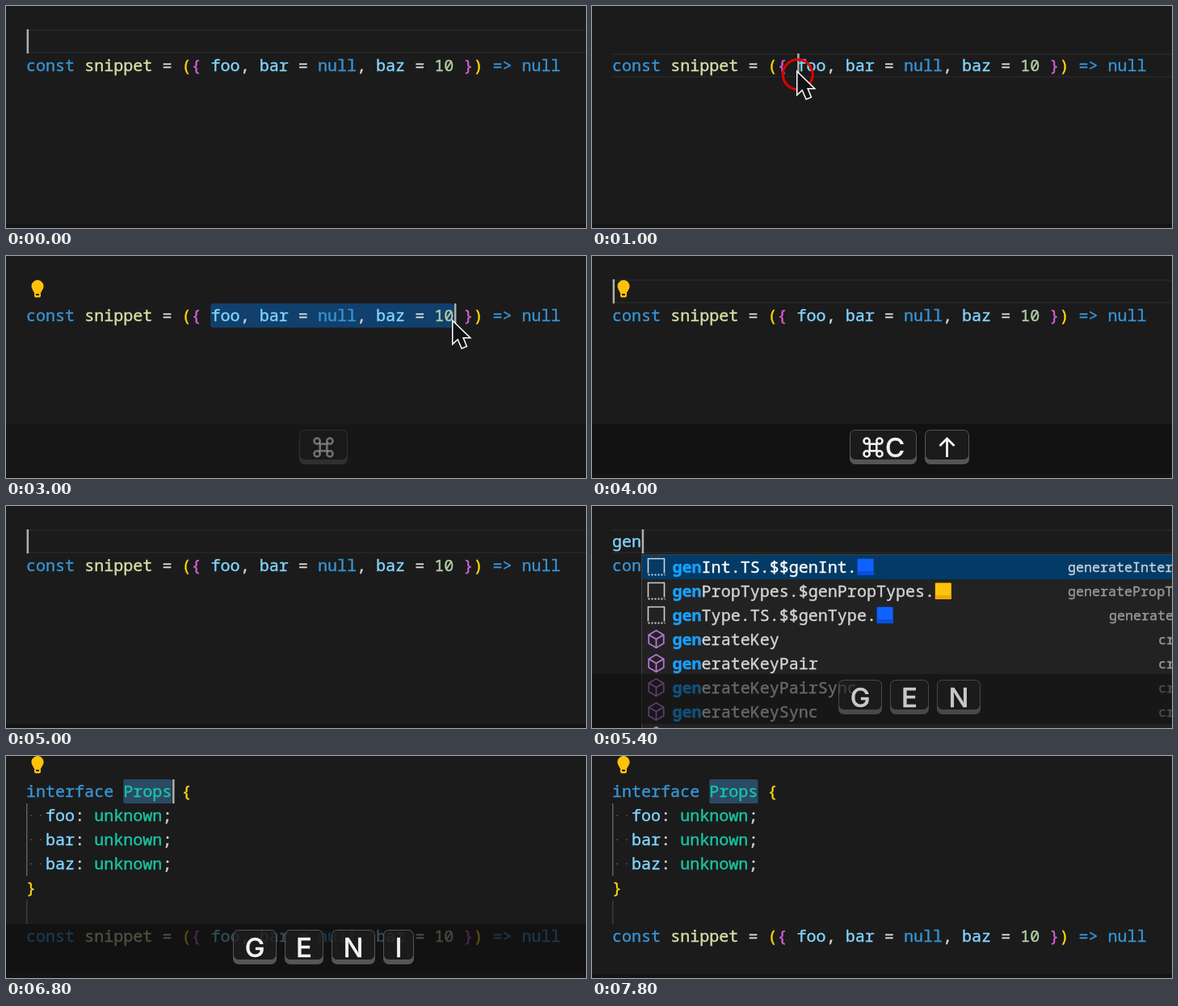
Animation, 718 px wide and 276 px high, one loop 8000 ms. Source, as an HTML page with a canvas:

```html
<!DOCTYPE html>
<html lang="en">
<head>
<meta charset="utf-8">
<title>Snippet demo</title>
<style>
  html, body { margin: 0; width: 100%; height: 100%; overflow: hidden; background: #1b1b1b; }
  canvas { display: block; }
</style>
</head>
<body>
<canvas id="stage" width="718" height="276"></canvas>
<script>
const ctx = document.getElementById('stage').getContext('2d');
const LOOP = 8000, STEP = 200;
const LEFT = 25, CHAR = 12.03, ROW = 30, TOP = 29;
const MONO = '"Noto Sans Mono", "DejaVu Sans Mono", monospace';
const CODE_FONT = `20.05px ${MONO}`, DETAIL_FONT = `16.7px ${MONO}`;
const KEY_FONT = '500 33px Inter, "DejaVu Sans", sans-serif';

const C = {
  bg: '#1b1b1b', keyword: '#3794d6', fn: '#d7dfa5', text: '#d4d4d4', paren: '#ffd70a',
  brace: '#d65fd6', name: '#80d4ff', number: '#b0cfa4', type: '#17c6a3', match: '#18a0fb',
};

const SNIPPET = [
  ['const', 'keyword'], [' snippet', 'fn'], [' = ', 'text'], ['(', 'paren'], ['{', 'brace'],
  [' foo', 'name'], [', ', 'text'], ['bar', 'name'], [' = ', 'text'], ['null', 'keyword'],
  [', ', 'text'], ['baz', 'name'], [' = ', 'text'], ['10', 'number'], [' }', 'brace'],
  [')', 'paren'], [' => ', 'keyword'], ['null', 'keyword'],
];

// Brackets in a label mark the matched letters.
const BLUE = ['#0f62ff', '#0a4fe0'], YELLOW = ['#ffc20a', '#f0a800'];
const GEN_ROWS = [
  ['snippet', '[gen]Int.TS.$$genInt.', 'generateInterface', 589, BLUE],
  ['snippet', '[gen]PropTypes.$genPropTypes.', 'generatePropTypes', 589, YELLOW],
  ['snippet', '[gen]Type.TS.$$genType.', 'generateType', 640, BLUE],
  ['cube', '[gen]erateKey', 'crypto', 701],
  ['cube', '[gen]erateKeyPair', 'crypto', 701],
  ['cube', '[gen]erateKeyPairSync', 'crypto', 701],
  ['cube', '[gen]erateKeySync', 'crypto', 701],
  ['cube', '[gen]eratePrime', 'crypto', 701],
];
const GENI_ROWS = [
  ['snippet', '[genI]nt.TS.$$genInt.', 'generateInterface', 601, BLUE],
  ['cube', '[GenI]con', 'react-icons', 663],
  ['cube', '[GenI]con', 'react-icons', 622],
  ['cube', '[ge]t[N]ext[I]nternalQuery', 'next/dist/server/request', 478],
  ['value', '[ge]t[In]trospectionQuery', 'graphql', 703],
  ['cube', '[gen]eratePr[i]me', 'crypto', 714],
  ['cube', '[gen]eratePr[i]meSync', 'crypto', 714],
  ['cube', '[gen]erateKeyPa[i]r', 'crypto', 714],
];

const KEY_WIDTH = { '⌘': 60, '⌘C': 83, '↑': 55, G: 54, E: 48, N: 54, I: 38 };
const KEY_STATES = [
  [3000, ['⌘']], [3200, ['⌘C']], [3600, ['⌘C', '↑']],
  [5200, ['G', 'E']], [5400, ['G', 'E', 'N']], [5600, ['G', 'E', 'N', 'I']],
];
const MOUSE_PATH = [
  [200, 330, 90], [600, 275, 85], [1000, 254, 82], [1300, 254, 82],
  [1400, 275, 82], [1600, 430, 82], [1800, 532, 82], [2000, 553, 81],
];
const CARET_RESETS = [0, 1000, 1400, 2000, 3600, 5200, 5400, 5600, 7000];

const col = n => LEFT + n * CHAR;
const lineTop = n => TOP + n * ROW;
const clamp = v => Math.max(0, Math.min(1, v));
const between = (t, a, b) => t >= a && t < b;

function rect(x, y, w, h, fill, radius = 0) {
  ctx.fillStyle = fill;
  ctx.beginPath();
  ctx.roundRect(x, y, w, h, radius);
  ctx.fill();
}

function stroke(points, color, width, closed) {
  ctx.beginPath();
  points.forEach(([x, y]) => ctx.lineTo(x, y));
  if (closed) ctx.closePath();
  ctx.strokeStyle = color;
  ctx.lineWidth = width;
  ctx.stroke();
}

// A hairline outline gives the text its slightly heavier weight.
function text(str, x, y, color, font = CODE_FONT) {
  ctx.font = font;
  ctx.fillStyle = ctx.strokeStyle = color;
  ctx.lineWidth = 0.4;
  ctx.lineJoin = 'round';
  ctx.fillText(str, x, y);
  ctx.strokeText(str, x, y);
  ctx.lineJoin = 'miter';
}

function codeLine(line, parts) {
  let n = 0;
  for (const [str, color] of parts) {
    text(str, col(n), lineTop(line) + 22, C[color]);
    n += str.length;
  }
}

function caret(t, line, n) {
  const since = CARET_RESETS.filter(r => r <= t).pop();
  if ((t - since) % 1000 < 500) rect(col(n) + 0.6, lineTop(line), 2.5, 30, '#aeafad');
}

function lineHighlight(line) {
  rect(LEFT, lineTop(line), 718, 2, '#242424');
  rect(LEFT, lineTop(line) + 28, 718, 2, '#242424');
}

function bulb(y) {
  ctx.fillStyle = '#ffc20a';
  ctx.beginPath();
  ctx.arc(39, y + 7.5, 7.5, Math.PI * 0.8, Math.PI * 2.2);
  ctx.lineTo(43, y + 16);
  ctx.lineTo(35, y + 16);
  ctx.fill();
  rect(35, y + 15, 8, 6.5, '#ffc20a', 2);
  rect(37, y + 17, 4, 2, C.bg);
}

function mouseAt(t) {
  const next = MOUSE_PATH.findIndex(p => p[0] > t);
  if (next === 0) return MOUSE_PATH[0].slice(1);
  if (next < 0) return MOUSE_PATH[MOUSE_PATH.length - 1].slice(1);
  const [t0, x0, y0] = MOUSE_PATH[next - 1], [t1, x1, y1] = MOUSE_PATH[next];
  const k = (t - t0) / (t1 - t0);
  return [x0 + (x1 - x0) * k, y0 + (y1 - y0) * k];
}

function mouse(t) {
  if (between(t, 1000, 2200)) {
    const [x, y] = mouseAt(t - 14);
    ctx.beginPath();
    ctx.arc(x, y + 3, 18.5, 0, Math.PI * 2);
    ctx.strokeStyle = '#e00000';
    ctx.lineWidth = 3;
    ctx.stroke();
  }
  const [x, y] = mouseAt(t);
  const shape = [[0, 0], [0, 26], [6, 20.5], [11, 32], [16, 30], [11.5, 19], [19.5, 19]]
    .map(([dx, dy]) => [x + dx + 0.5, y + dy + 1]);
  stroke(shape, '#fff', 3, true);
  ctx.fillStyle = '#111';
  ctx.fill();
}

function cube(x, y, r, color) {
  const corner = i => [x + r * Math.sin(i * Math.PI / 3), y - r * Math.cos(i * Math.PI / 3)];
  stroke([0, 1, 2, 3, 4, 5].map(corner), color, 1.8, true);
  stroke([corner(5), [x, y], corner(1)], color, 1.8);
  stroke([[x, y], corner(3)], color, 1.8);
}

function icon(kind, x, y) {
  if (kind === 'cube') return cube(x, y, 10.7, '#b573d8');
  if (kind === 'value') {
    const color = '#4fb3f6';
    for (const s of [-1, 1])
      stroke([[x + s * 8, y - 7], [x + s * 11, y - 7], [x + s * 11, y + 7], [x + s * 8, y + 7]], color, 1.8);
    const point = ([dx, dy]) => [x + dx, y + dy];
    stroke([[-6, 0], [2, -4.5], [6, -2], [6, 1.5], [-2, 5], [-6, 3]].map(point), color, 1.6, true);
    stroke([[-6, 0], [-2, 1.5], [6, -2]].map(point), color, 1.4);
    stroke([[-2, 1.5], [-2, 5]].map(point), color, 1.4);
    return;
  }
  stroke([[x - 10, y + 8], [x - 10, y - 10], [x + 10, y - 10], [x + 10, y + 8]], '#d0d0d0', 1.6);
  ctx.setLineDash([2, 2]);
  stroke([[x - 10, y + 10], [x + 11, y + 10]], '#d0d0d0', 1.8);
  ctx.setLineDash([]);
}

function popup(rows, x) {
  rect(x - 1, 60, 718, 218, '#414141');
  rect(x, 61, 718, 218, '#222222');
  rect(x, 61, 718, 30, '#033b66');
  rows.forEach(([kind, label, detail, detailX, swatch], i) => {
    const mid = 76 + i * ROW;
    icon(kind, x + 17.5, mid - 0.5);
    let tx = x + 37.5;
    label.split(/[[\]]/).forEach((part, j) => {
      const matched = j % 2;
      text(part, tx, mid + 7, matched ? C.match : i ? C.text : '#fff', (matched ? 'bold ' : '') + CODE_FONT);
      tx += part.length * CHAR;
    });
    if (swatch) {
      rect(tx + 0.5, mid - 10.5, 20, 20.5, swatch[0], 1);
      rect(tx + 0.5, mid + 5, 20, 5, swatch[1], 1);
    }
    text(detail, detailX, mid + 6, i ? '#989898' : '#c8d0d8', DETAIL_FONT);
  });
}

function commandSign(x, y) {
  const a = 4.3, r = 3.6, b = a + r;
  ctx.strokeStyle = '#f2f2f2';
  ctx.lineWidth = 2.6;
  ctx.strokeRect(x - a, y - a, 2 * a, 2 * a);
  for (const sx of [-1, 1]) for (const sy of [-1, 1]) {
    ctx.beginPath();
    ctx.arc(x + sx * b, y + sy * b, r, 0, Math.PI * 2);
    ctx.stroke();
  }
}

function keycap(label, x) {
  const w = KEY_WIDTH[label], mid = x + w / 2;
  // The rim is the cap minus its translucent face.
  ctx.beginPath();
  ctx.roundRect(x, 216, w, 43, 7);
  ctx.roundRect(x + 1, 217, w - 2, 36, 6);
  ctx.fillStyle = '#555';
  ctx.fill('evenodd');
  rect(x + 1, 217, w - 2, 36, 'rgba(30,30,30,.75)', 6);
  ctx.textAlign = 'center';
  if (label[0] === '⌘') {
    const pair = label.length > 1;
    commandSign(pair ? x + 29 : mid, 238);
    if (pair) text('C', x + 56, 250, '#f2f2f2', KEY_FONT);
  } else if (label === '↑') {
    stroke([[mid, 250], [mid, 227]], '#f2f2f2', 2.8);
    stroke([[mid - 9, 236], [mid, 227], [mid + 9, 236]], '#f2f2f2', 2.8);
  } else {
    text(label, mid, 250, '#f2f2f2', KEY_FONT);
  }
  ctx.textAlign = 'left';
}

function keyOverlay(t) {
  const state = KEY_STATES.filter(([start]) => start <= t).pop();
  if (!state) return;
  const [shown, hidden] = t < 5100 ? [2860, 4900] : [5120, 7500];
  const alpha = clamp((t - shown) / 350) * clamp((hidden - t) / 500);
  if (!alpha) return;
  ctx.globalAlpha = alpha;
  rect(0, 209, 718, 62, 'rgba(14,14,14,.68)');
  const keys = state[1];
  let x = 393 - (keys.reduce((sum, k) => sum + KEY_WIDTH[k] + 10, 0) - 10) / 2;
  for (const key of keys) {
    keycap(key, x);
    x += KEY_WIDTH[key] + 10;
  }
  ctx.globalAlpha = 1;
}

function selectScene(t) {
  const clicked = t >= 1000 && t < 3600;
  const end = Math.round((mouseAt(t - 28)[0] - LEFT) / CHAR);
  const selecting = clicked && end > 19;
  if (selecting) rect(col(19) - 0.5, 59, col(end) - col(19) + 1, 30, '#10406b', 4);
  else lineHighlight(clicked ? 1 : 0);
  codeLine(1, SNIPPET);
  if (between(t, 1600, 4600)) bulb(30);
  if (clicked) caret(t, 1, end);
  else caret(t, 0, 0);
  if (between(t, 200, 3600)) mouse(t);
}

function typeScene(t) {
  const typed = 'geni'.slice(0, t < 5400 ? 2 : t < 5600 ? 3 : 4);
  lineHighlight(0);
  codeLine(0, [[typed, 'name']]);
  codeLine(1, SNIPPET);
  caret(t, 0, typed.length);
  if (t >= 6000) bulb(0);
  if (between(t, 5400, 5600)) popup(GEN_ROWS, 62);
  else if (between(t, 5600, 6400)) popup(GENI_ROWS, 74.5);
}

function resultScene(t) {
  rect(col(10), 29, 5 * CHAR, 30, '#2b4a66', 2);
  rect(LEFT, 59, 1.5, 90, '#606060');
  rect(LEFT, 179, 1.5, 30, '#3c3c3c');
  codeLine(0, [['interface', 'keyword'], [' Props', 'type'], [' {', 'paren']]);
  ['foo', 'bar', 'baz'].forEach((prop, i) => {
    for (const n of [0, 1]) rect(col(n) + 5, lineTop(i + 1) + 14, 2, 2, '#404040');
    codeLine(i + 1, [['  ' + prop, 'name'], [': ', 'text'], ['unknown', 'type'], [';', 'text']]);
  });
  codeLine(4, [['}', 'paren']]);
  codeLine(6, SNIPPET);
  caret(t, 0, 15);
  bulb(0);
}

function draw(t) {
  rect(0, 0, 718, 276, C.bg);
  rect(0, 271, 718, 5, '#151314');
  (t < 5200 ? selectScene : t < 6600 ? typeScene : resultScene)(t);
  keyOverlay(t);
}

function tick() {
  draw(Math.floor(performance.now() % LOOP / STEP) * STEP);
  requestAnimationFrame(tick);
}
tick();
</script>
</body>
</html>
```
